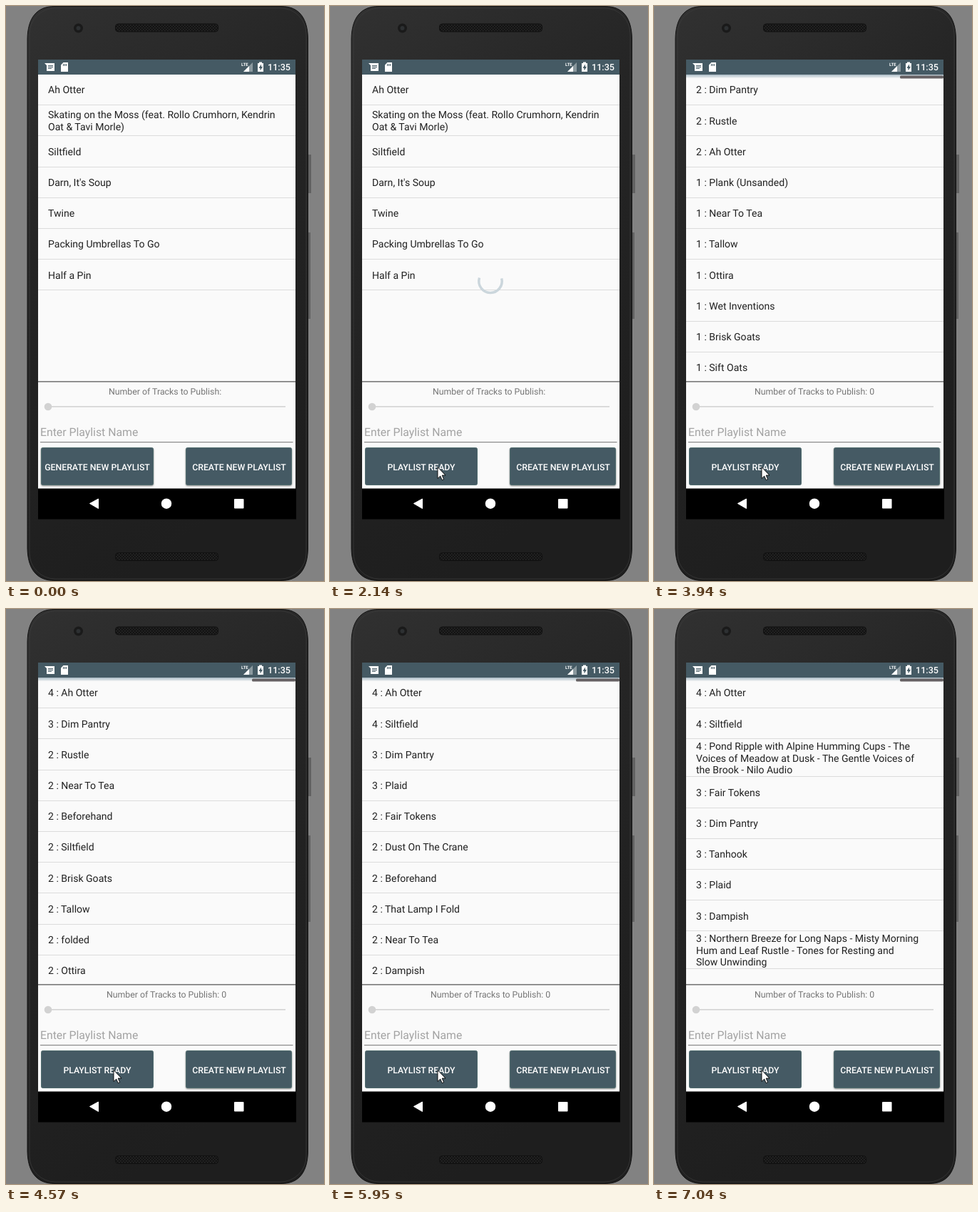
Animation, 446 px wide and 805 px high, one loop 8050 ms. Source, as an HTML page:

```html
<!DOCTYPE html>
<html lang="en">
<head>
<meta charset="utf-8">
<title>Playlist maker</title>
<style>
  html, body { margin: 0; width: 100%; height: 100%; overflow: hidden; background: #828282; }
  svg { display: block; width: 446px; height: 805px; font-family: Roboto, sans-serif; text-rendering: geometricPrecision; }
  #rows text { font-size: 14.05px; fill: #212121; }
  #rows rect { fill: #dcdcdc; }
  .button rect { fill: #455a64; stroke: #506c6e; }
  .button text { font-size: 12.3px; font-weight: 500; fill: #fff; text-anchor: middle; }
  .raised { filter: drop-shadow(0 1.5px 1.2px #0007); }
</style>
</head>
<body>
<svg viewBox="0 0 446 805">
  <defs>
    <linearGradient id="body" x2=".35" y2="1">
      <stop stop-color="#313131"/>
      <stop offset=".4" stop-color="#252525"/>
      <stop offset="1" stop-color="#1e1e1e"/>
    </linearGradient>
    <linearGradient id="shade" x2="0" y2="1">
      <stop stop-color="#a9bac4"/>
      <stop offset="1" stop-color="#fafafa"/>
    </linearGradient>
    <pattern id="mesh" width="4" height="4" patternUnits="userSpaceOnUse">
      <rect width="4" height="4" fill="#131313"/>
      <path d="M0 0h1.5v1.5H0zM2 2h1.5v1.5H2z" fill="#2b2b2b"/>
    </pattern>
    <clipPath id="list"><rect x="45" y="96" width="361" height="429.5"/></clipPath>
  </defs>

  <!-- phone -->
  <rect width="446" height="805" fill="#828282"/>
  <path d="M423 208h5v54h-5zM423 317h4v121h-4z" fill="#626262"/>
  <path id="case" d="M30 46C30.500 18 42 .5 68 .5H386C412 .5 423 18 423.500 46V759C423 787 412 804.500 386 804.500H68C42 804.500 30.500 787 30 759Z"
        fill="url(#body)" stroke="#141414"/>
  <rect x="33" y="3" width="388" height="799" rx="36" fill="none" stroke="#3c3c3c" stroke-opacity=".7"/>
  <circle cx="101.500" cy="31" r="6.500" fill="#1a1a1a"/>
  <circle cx="101.500" cy="31" r="3" fill="#2d3032"/>
  <g fill="url(#mesh)" stroke="#101010">
    <rect x="153.500" y="25" width="144" height="11" rx="4"/>
    <rect x="153.500" y="765.500" width="144" height="11" rx="4"/>
  </g>

  <!-- screen -->
  <rect x="45" y="75" width="361" height="601" fill="#fafafa"/>
  <rect x="45" y="75" width="361" height="21" fill="#455a64"/>
  <path d="M54 80h14v11H57V83z" fill="#fff"/>
  <path d="M59 83.500h7M59 85.500h7M59 87.500h5" stroke="#455a64"/>
  <path d="M80.500 79H87v13H77V82.500z" fill="#fff"/>
  <path d="M80.500 81v3M82.500 81v3M84.500 81v3" stroke="#455a64"/>
  <path d="M346 79V92H333z" fill="#8b999f"/>
  <path d="M341 84V92H333z" fill="#fff"/>
  <text x="330" y="84" font-size="6" font-weight="700" fill="#fff">LTE</text>
  <path d="M355 80v-1.500h4V80h2v12h-8V80z" fill="#fff"/>
  <path d="M358 81.500l-3.500 5.500h2v3.500l3.500-5.500h-2z" fill="#455a64"/>
  <text x="367" y="90" font-size="12.6" font-weight="500" fill="#fff">11:35</text>

  <g id="rows" clip-path="url(#list)"></g>
  <g id="edge">
    <rect x="45" y="96" width="361" height="5.500" fill="url(#shade)"/>
    <rect x="345" y="97.500" width="61" height="4" rx="1.500" fill="#666163"/>
  </g>

  <rect x="45" y="525" width="361" height="1.700" fill="#808080"/>
  <text id="count" y="544" font-size="12.3" fill="#757575"></text>
  <path d="M59 560.800H392" stroke="#d6d6d6" stroke-width="1.700"/>
  <circle cx="59" cy="561" r="5.300" fill="#d2d2d2"/>
  <text x="48" y="602" font-size="15.8" fill="#a3a3a3">Enter Playlist Name</text>
  <path d="M48 610.700H402.500" stroke="#8b8b8b" stroke-width="1.200"/>
  <g class="button" id="make">
    <rect x="49.500" y="618.500" width="157" height="52" rx="2"/>
    <text x="128" y="649.500"></text>
  </g>
  <g class="button raised">
    <rect x="252.500" y="618.500" width="148" height="52" rx="2"/>
    <text x="327" y="649.500">CREATE NEW PLAYLIST</text>
  </g>

  <rect x="45" y="675.500" width="362" height="43" fill="#000"/>
  <g fill="#fff">
    <path d="M117.500 696.500L129.500 690V703.500z" stroke="#fff" stroke-linejoin="round"/>
    <circle cx="225" cy="696.700" r="7.200"/>
    <rect x="320" y="690" width="13.500" height="13.500" rx="1"/>
  </g>

  <path id="spinner" fill="none" stroke="#cbd6dc" stroke-width="3.500"/>
  <path id="cursor" d="M.5 .5V16.500L4.200 13l2.500 5.600 2.400-1-2.400-5.600H11.500z" fill="#fff" stroke="#000" stroke-width=".9"/>
</svg>

<script>
const LOOP = 8050, PRESS = 1850, READY = 3710;
const $ = id => document.getElementById(id);

const pond = 'Pond Ripple with Alpine Humming Cups - The/Voices of Meadow at Dusk - The Gentle Voices of/the Brook - Nilo Audio';
const breeze = 'Northern Breeze for Long Naps - Misty Morning/Hum and Leaf Rustle - Tones for Resting and/Slow Unwinding';

// Start time and rows; "/" breaks a line, a leading digit is the play count
const lists = [
  [0, "Ah Otter|Skating on the Moss (feat. Rollo Crumhorn, Kendrin/Oat &amp; Tavi Morle)|Siltfield|Darn, It's Soup|Twine|Packing Umbrellas To Go|Half a Pin"],
  [READY, "1 Ah Otter|1 Siltfield|1 That Pond is Our Spoon|1 Dim Pantry|1 Rustle|1 Beforehand|1 Tallow|1 Near To Tea|1 folded|1 Sift Oats"],
  [3940, "2 Dim Pantry|2 Rustle|2 Ah Otter|1 Plank (Unsanded)|1 Near To Tea|1 Tallow|1 Ottira|1 Wet Inventions|1 Brisk Goats|1 Sift Oats"],
  [4340, "3 Ah Otter|2 Dim Pantry|2 Rustle|2 Near To Tea|1 Twelve Onions in a Row|1 Beforehand|1 Tallow|1 Siltfield|1 Brisk Goats|1 folded"],
  [4570, "4 Ah Otter|3 Dim Pantry|2 Rustle|2 Near To Tea|2 Beforehand|2 Siltfield|2 Brisk Goats|2 Tallow|2 folded|2 Ottira"],
  [4880, "4 Ah Otter|3 Dim Pantry|2 Valdorina Whittlin'|2 Siltfield|2 Rustle|2 folded|2 That Lamp I Fold|2 Near To Tea|2 Beforehand|2 Brisk Goats"],
  [5110, "4 Ah Otter|3 Dim Pantry|2 Beforehand|2 Valdorina Whittlin'|2 Siltfield|2 That Pond is Our Spoon|2 folded|2 That Lamp I Fold|2 Near To Tea|2 Socks In Autumn"],
  [5410, "4 Ah Otter|3 Dim Pantry|3 Siltfield|2 Plaid|2 Beforehand|2 Slow Kettle in an Empty Attic|2 That Lamp I Fold|2 folded|2 Near To Tea|2 Socks In Autumn"],
  [5650, "4 Ah Otter|4 Siltfield|3 Dim Pantry|2 Dust On The Crane|2 Plaid|2 Beforehand|2 Slow Kettle in an Empty Attic|2 That Lamp I Fold|2 folded|2 Near To Tea"],
  [5950, "4 Ah Otter|4 Siltfield|3 Dim Pantry|3 Plaid|2 Fair Tokens|2 Dust On The Crane|2 Beforehand|2 That Lamp I Fold|2 Near To Tea|2 Dampish"],
  [6270, "4 Ah Otter|4 Siltfield|3 Fair Tokens|3 Dim Pantry|3 Plaid|2 Tanhook|2 Dust On The Crane|2 Beforehand|2 Dampish|2 That Lamp I Fold"],
  [6500, `4 Ah Otter|4 Siltfield|4 ${pond}|3 Fair Tokens|3 Dim Pantry|3 Plaid|3 ${breeze}|2 Tanhook|2 Dampish`],
  [7040, `4 Ah Otter|4 Siltfield|4 ${pond}|3 Fair Tokens|3 Dim Pantry|3 Tanhook|3 Plaid|3 Dampish|3 ${breeze}`]
];

function rowsMarkup(rows) {
  let y = 95.5;
  return rows.split('|').map(row => {
    const lines = row.replace(/^(\d) /, '$1 : ').split('/');
    const height = lines.length > 2 ? 53 : 43.2;
    const base = y + height / 2 + 5.2 - (lines.length - 1) * 8.2;
    y += height;
    return lines.map((s, i) => `<text x="59" y="${base + i * 16.4}">${s}</text>`).join('') +
      `<rect x="45" y="${Math.floor(y)}" width="361" height="1"/>`;
  }).join('');
}

// Height of the curve (0,0) (x1,0) (x2,1) (x3,1) at x
function curve(x, x1, x2, x3) {
  let lo = 0, hi = 1;
  for (let i = 0; i < 20; i++) {
    const u = (lo + hi) / 2, v = 1 - u;
    if (3 * u * v * v * x1 + 3 * u * u * v * x2 + u ** 3 * x3 < x) lo = u; else hi = u;
  }
  return lo * lo * (3 - 2 * lo);
}

function spinnerPath(ms) {
  const p = ms / 1333 % 1;
  const turn = p / 4 + ms / 2222 - .25;
  const head = .75 * curve(Math.min(p, .5), .2, .1, .5) + .01;
  const tail = p < .5 ? 0 : .75 * curve(p - .5, .2, .1, .5);
  const point = a => {
    const r = 2 * Math.PI * (a + turn);
    return `${225 + 16.2 * Math.cos(r)} ${385.3 + 16.2 * Math.sin(r)}`;
  };
  return `M${point(tail)}A16.2 16.2 0 ${head - tail > .5 ? 1 : 0} 1 ${point(head)}`;
}

const show = (id, on) => $(id).style.display = on ? '' : 'none';

function moveCursor(t) {
  let x, y;
  if (t < 990) {
    const k = Math.min(Math.floor((t - 610) / 75), 2) / 2;
    x = 250 - 52 * k;
    y = 733 - 65 * k;
  } else {
    const k = Math.min(Math.floor((t - 990) / 76) + 1, 6) / 6;
    x = 198 - 47.5 * k;
    y = 668 - 23 * k;
  }
  $('cursor').setAttribute('transform', `translate(${x} ${y})`);
}

let shown = -1;
function draw(t) {
  const index = lists.findLastIndex(l => l[0] <= t);
  if (index !== shown) {
    shown = index;
    $('rows').innerHTML = rowsMarkup(lists[index][1]);
    $('count').textContent = 'Number of Tracks to Publish:' + (index ? ' 0' : '');
    $('count').setAttribute('x', index ? 141 : 144);
    show('edge', index > 0);
  }
  const pressed = t >= PRESS;
  $('make').classList.toggle('raised', !pressed);
  $('make').lastElementChild.textContent = pressed ? 'PLAYLIST READY' : 'GENERATE NEW PLAYLIST';

  const loading = pressed && t < READY;
  show('spinner', loading);
  if (loading) $('spinner').setAttribute('d', spinnerPath(Math.floor((t - 1840) / 75) * 75 + 30));

  show('cursor', t >= 610);
  moveCursor(t);
}

const start = performance.now();
function frame() {
  draw((performance.now() - start) % LOOP);
  requestAnimationFrame(frame);
}
frame();
</script>
</body>
</html>
```
